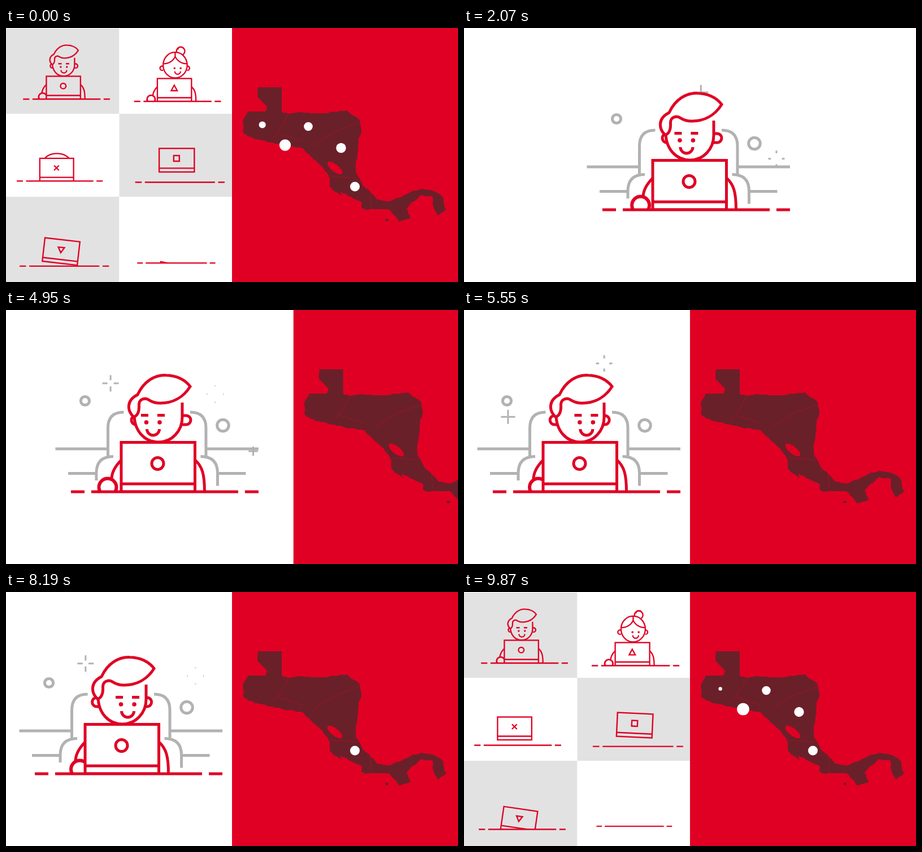
Recreate the animation shown at these times as an HTML page. Size 800 by 450 pixels, loop 9900 ms.

```html
<!DOCTYPE html>
<html lang="en">
<head>
<meta charset="utf-8">
<title>Remote work map</title>
<style>
html, body { margin: 0; width: 100%; height: 100%; overflow: hidden; background: #fff; }
svg { display: block; width: 800px; height: 450px; }
</style>
</head>
<body>
<svg viewBox="0 0 800 450" xmlns="http://www.w3.org/2000/svg">
  <defs>
    <clipPath id="desk"><rect x="-200" y="-300" width="1200" height="623"/></clipPath>
  </defs>
  <g id="left" fill="none"></g>
  <g id="panel">
    <rect x="400" width="420" height="450" fill="#e00024"/>
    <g id="map" fill="#6a2029"></g>
    <g id="pins" fill="#fff"></g>
  </g>
</svg>
<script>
const LOOP = 9900, RED = '#e00024', GREY = '#b2b2b2', SHADE = '#e2e2e2';
const $ = id => document.getElementById(id);
const clamp = v => Math.max(0, Math.min(1, v));
const part = (t, start, dur) => clamp((t - start) / dur);
const inOut = p => p < .5 ? 4 * p ** 3 : 1 - 4 * (1 - p) ** 3;
const out = p => 1 - (1 - p) ** 3;
const back = p => 1 + 2.2 * (p - 1) ** 3 + 1.2 * (p - 1) ** 2;
const pop = age => age <= 0 ? 0 : 1 - Math.exp(-age / 160) * Math.cos(Math.PI * age / 200);
const fract = v => v - Math.floor(v);
const f = v => +v.toFixed(2);

const path = (d, extra = '') => `<path d="${d}" ${extra}/>`;
const ring = (x, y, r, extra = '') => `<circle cx="${f(x)}" cy="${f(y)}" r="${f(r)}" ${extra}/>`;
const oval = (x, y, rx, ry, extra = '') => `<ellipse cx="${x}" cy="${y}" rx="${rx}" ry="${ry}" ${extra}/>`;
const group = (body, extra) => `<g ${extra}>${body}</g>`;

// ---- map: a few key points, the coast between them roughened ----
const SHORE = `446,105 488,105 488,148 500,152 517,149 540,151 565,151 590,147 603,146 612,154
  622,159 627,167 629,180 624,200 622,225 619,240 620,258 632,279 645,291 657,304 680,307 700,299
  720,288 734,285 760,290 772,298 779,321 764,332 757,319 755,299 735,296 718,309 709,320 716,337
  696,343 690,334 676,321 652,321 637,322 629,318 630,309 606,298 592,290 595,298 583,290 573,281
  573,267 560,246 540,228 525,213 488,207 440,197 420,186 419,165 428,148 459,148 462,139 445,122`;
const BORDERS = 'M500 152 490 172 471 196M481 186 525 201M626 167 586 182 557 199 543 211M573 262 600 264 622 266M645 291 646 317';

function roughen(text) {
  const pts = text.trim().split(/\s+/).map(p => p.split(',').map(Number));
  let seed = 7;
  const jitter = () => (seed = seed * 16807 % 2147483647) / 2147483647 * 2.4 - 1.2;
  return 'M' + pts.map(([x, y], i) => {
    const [nx, ny] = pts[(i + 1) % pts.length];
    const steps = x === nx || y === ny ? 1 : Math.ceil(Math.hypot(nx - x, ny - y) / 6);
    let d = `${x} ${y} `;
    for (let s = 1; s < steps; s++)
      d += `${f(x + (nx - x) * s / steps + jitter())} ${f(y + (ny - y) * s / steps + jitter())} `;
    return d;
  }).join('') + 'Z';
}

$('map').innerHTML = path(roughen(SHORE)) + oval(674, 340, 3, 2) +
  path(BORDERS, `fill="none" stroke="#b80c26" stroke-width=".7"`) +
  oval(582, 248, 16, 6.5, `fill="${RED}" transform="rotate(38 582 248)"`);

const PINS = [[617.5, 281], [593, 212.5], [535, 174.5], [494, 207.5], [453.7, 171.5]];
const pin = (t, [x, y], i) => ring(x, y, 8.5 * pop(t - (i ? 9170 + 165 * i : 6300)));

// ---- desk scene, drawn around the desk line y = 322 ----
const LOGOS = [
  ring(398.5, 272, 10.5),
  path('M398.5 260 410 281H387Z'),
  path('M389 262 408 281M408 262 389 281'),
  path('M388 261H409V282H388Z'),
  path('M387 263H410L398.5 283Z'),
  ring(398.5, 272, 10.5)
];

// flies up tilted from below the desk, levels out, drops
function laptop(t, logo, bg) {
  if (t < 660) return '';
  const rise = Math.max(0, (960 - t) / 210), fall = part(t, 960, 90);
  const lift = 38 * (1 - fall ** 2) - 134 * rise ** 1.85;
  return group(`<rect x="334" y="234.5" width="130.5" height="87.5" fill="${bg}"/>` +
    path('M334 308H464.5') + LOGOS[logo],
    `transform="translate(0 ${f(-lift)}) rotate(${f(13 * rise ** .8)} 399 278)"`);
}

// turn runs from -1 (left) to 1 (right)
function face(turn, brows = true) {
  const x = f(400.5 + 10.5 * turn);
  return (brows ? path(`M${x - 21} 186.5h13M${x + 8} 186.5h13`) : '') +
    path(`M${x - 10.5} 211a11 11 0 0 0 22 0`) +
    group(ring(x - 11.5, 199, 3.8) + ring(x + 12, 199, 3.8), `fill="${RED}" stroke="none"`);
}

function ears(turn, l, r) {
  const d = -3 * turn;
  return path(`M${l} 187H${f(l - 1 + d)}a8 8 0 0 0 0 16H${l}M${r} 187H${f(r + 4 + d)}a8 8 0 0 1 0 16H${r}`);
}

const HEADS = [
  (turn, fill) => ears(turn, 358, 442) +
    path('M357 185C357 215 376 234 400 234C424 234 442 214 442 190V164', fill) + face(turn) +
    path('M363 150C374 126 394 114.5 413 115.5C431 116 447 123 456 135.5C444 155 425 165 403 165C385 165 384 157 376 157C368 158 365 162 365.5 170C366 181 362 188 356 189.5C344 178 343 160 363 150Z', fill),
  (turn, fill) => ears(turn, 356, 448) + ring(423, 130, 16, fill) + oval(402, 183, 46, 49, fill) +
    path('M402 150C395 168 376 178 357 178M402 150C410 168 428 178 447 178M402 134V150M412 124C414 112 430 110 436 122') +
    group(face(turn, false), 'transform="translate(0 -4)"'),
  (turn, fill) => ears(turn, 354, 446) + oval(400, 180, 46, 54, fill) + face(turn) + oval(400, 146, 50, 30, fill)
];

function person(t, kind, turn, hand, bg) {
  const p = part(t, 1035, 270);
  if (!p) return '';
  const fill = `fill="${bg}"`, arm = 90 * (1 - out(part(t, 1080, 210)));
  return group(HEADS[kind](turn, fill), `transform="translate(0 ${f(130 * (1 - back(p)))})"`) +
    group(path('M334 266C324 276 317 288 317 300M465 266C477 277 481.5 290 481.5 322') +
      ring(hand, 314, 15.5, fill + ' stroke-width="6"'), `transform="translate(0 ${f(arm)})"`);
}

function desk(t) {
  const w = out(part(t, 30, 450));
  return path('M245 322h24m12 0h260m12 0h24', `transform="translate(${f(411 * (1 - w))} 0) scale(${f(w)} 1)"`);
}

const worker = (t, kind, logo, turn, hand, bg) => group(
  group(person(t, kind, turn, hand, bg) + laptop(t, logo, bg), 'clip-path="url(#desk)"') + desk(t),
  `stroke="${RED}" stroke-width="5"`);

function sofa(t) {
  const p = out(part(t, 200, 550));
  if (!p) return '';
  const dash = p < 1 ? `pathLength="1" stroke-dasharray="${f(p)} 2"` : '';
  const half = foot => ['M310.5 246H217.5', 'M290 289.5H240', 'M310.5 259V209Q310.5 181 338.5 181',
    `M290 ${foot}V289Q290 259.5 320 259.5`].map(d => path(d, dash)).join('');
  return group(half(302) + group(half(311.5), 'transform="translate(794.5 0) scale(-1 1)"') +
    ring(270, 161, 7.6 * pop(t - 250)) + ring(514, 204.5, 10.3 * pop(t - 330)),
    `stroke="${GREY}" stroke-width="5"`);
}

// plus signs on an arc over the sofa that burst into dashes, then dots
function spark(t, i) {
  const p = (t - 330 - 250 * i) / 700;
  if (p <= 0 || p > .89) return '';
  const angle = Math.PI * (1.2 * fract(.82 + .618 * i) - .1), size = 1 + .1 * Math.sin(5 * i);
  const x = f(405 - 150 * size * Math.cos(angle)), y = f(235 - 135 * size * Math.sin(angle));
  const a = Math.max(0, (p - .3) * 24);
  const b = Math.max(a + 1, 14.5 * (1 - (1 - clamp(p * 2)) ** 2));
  return [0, 90, 180, 270].map(r =>
    path(`M${f(a)} 0H${f(b)}`, `transform="translate(${x} ${y}) rotate(${r})"`)).join('');
}

function room(t) {
  const turn = -Math.cos(2 * Math.PI * (t - 4950) / 1350);
  let sparks = '';
  for (let i = 0; i < 31; i++) sparks += spark(t, i);
  return group(sofa(t) + group(sparks, `stroke="${GREY}" stroke-width="3"`) +
    worker(t, 0, 0, turn, 318 + 8 * turn, '#fff'),
    `transform="translate(${f(-194 * inOut(part(t, 4324, 1110)))} 0)"`);
}

// ---- grid of six desks ----
const CELLS = [
  { x: 101.5, y: 126, start: 8300, kind: 0, turn: 0, hand: 320 },
  { x: 298, y: 130, start: 8550, kind: 1, turn: 1, hand: 310 },
  { x: 89.5, y: 271.5, start: 8850, kind: 2, turn: 0, hand: 318 },
  { x: 302, y: 271.8, start: 8940, kind: 0, turn: 0, hand: 318 },
  { x: 97.5, y: 420.5, start: 9030, kind: 1, turn: 0, hand: 318 },
  { x: 296, y: 421, start: 9150, kind: 2, turn: 0, hand: 318 }
];
const TOPS = [1, 152, 299, 450];

const swell = t => out(part(t, 600, 180)) *
  (1 + .067 * Math.exp((840 - t) / 225) * Math.sin(Math.PI * (t - 840) / 180));

function cell(t, c, i) {
  const open = out(part(t, 8200 + 60 * i, 300));
  if (!open) return '';
  const col = i % 2, row = i >> 1, top = TOPS[row], bottom = TOPS[row + 1];
  const bg = (col + row) % 2 ? '#fff' : SHADE, age = t - c.start, s = swell(age);
  const box = `<rect x="${200.5 * col}" y="${top}" width="${f((200.5 - col) * open)}" height="${bottom - top}" fill="${bg}"/>`;
  if (age < 600) return box;
  const cx = 100 + 200 * col, cy = (top + bottom) / 2;
  return box + group(worker(age, c.kind, i, c.turn, c.hand, bg),
    `transform="translate(${cx} ${cy}) scale(${f(s)}) translate(${c.x - cx} ${c.y - cy}) scale(.463) translate(-399 -322)"`);
}

function draw(now) {
  let t = now % LOOP;
  if (t < 30) t += LOOP; // the last picture is held across the wrap
  $('left').innerHTML = (t < 8800 ? room(t) : '') + CELLS.map((c, i) => cell(t, c, i)).join('');
  $('panel').setAttribute('transform', `translate(${f(400 * (1 - inOut(part(t, 4294, 1110))))} 0)`);
  $('pins').innerHTML = PINS.map((p, i) => pin(t, p, i)).join('');
}

const begin = performance.now();
function tick() {
  draw(performance.now() - begin);
  requestAnimationFrame(tick);
}
tick();
</script>
</body>
</html>
```
